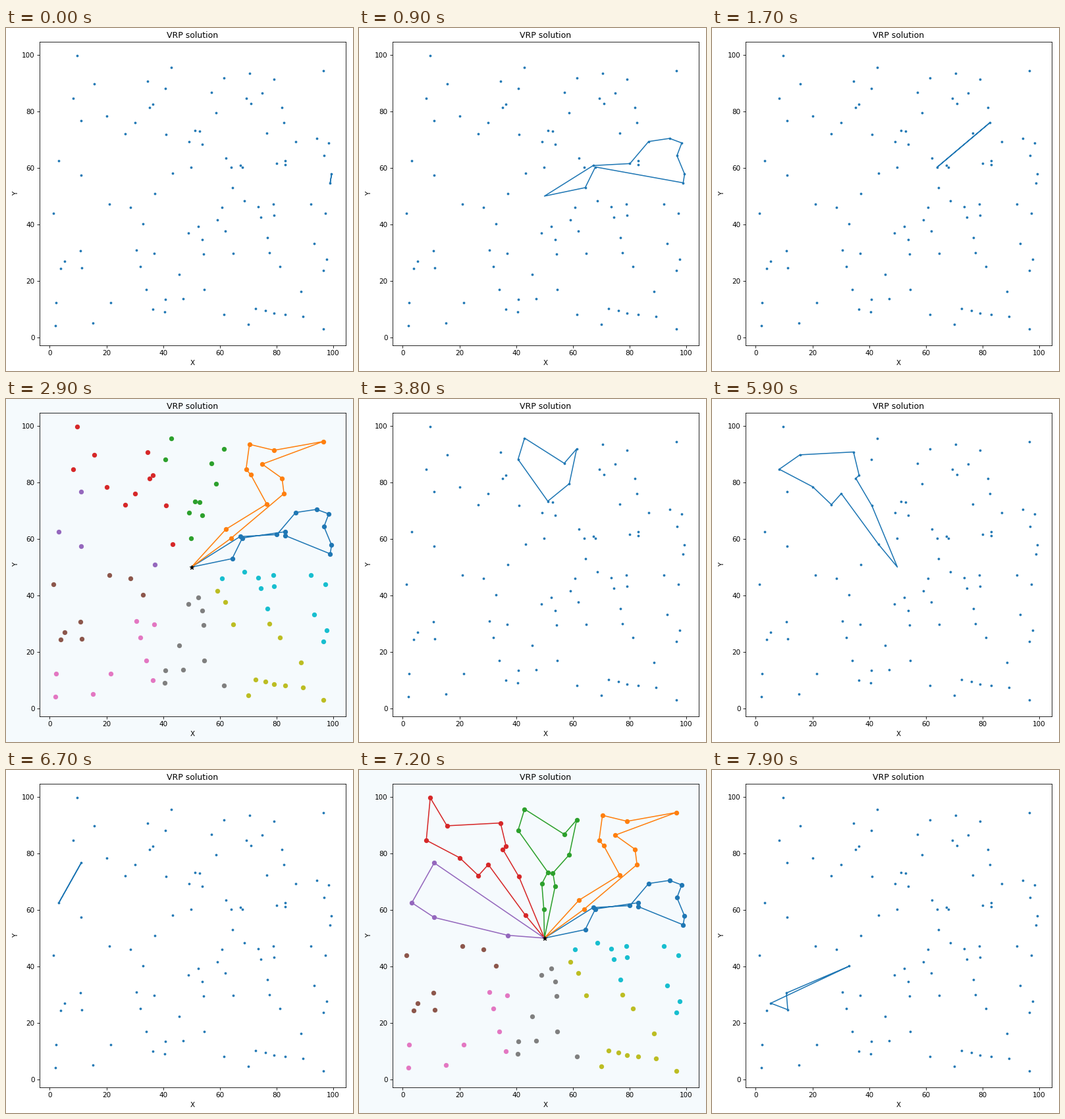
These frames come from a looping animation (527x522 px, 8 s). A matplotlib script:

```python
import math
import random

import matplotlib.pyplot as plt
from matplotlib.animation import FuncAnimation
from matplotlib.patches import Rectangle

W, H, DPI = 527, 522, 75
STEP_MS = 100
TINT = "#f5fafd"
DEPOT = (50, 50)
SECTORS = 10

plt.rcParams["font.family"] = "DejaVu Sans"

# Stops of each route in the order they are joined, one 36 degree sector each
routes = [
    [(99, 54.7), (99.5, 57.8), (96.8, 64.3), (98.5, 68.8), (94.2, 70.4),
     (86.8, 69.3), (80.2, 61.5), (67.2, 60.8), DEPOT, (64.4, 53),
     (68, 60.3), (83, 62.5), (83, 61.2)],
    [(82.7, 76), (64, 60.2), DEPOT, (62.2, 63.4), (76.6, 72.3), (71, 82.6),
     (69.3, 84.6), (70.5, 93.4), (79.2, 91.3), (96.5, 94.4), (75, 86.4),
     (82, 81.4)],
    [(58.8, 79.5), (61.4, 91.8), (57, 86.7), (43, 95.6), (40.7, 88.1),
     (51.2, 73.3), (49.1, 69.2), (49.8, 60.2), DEPOT, (53.8, 68.3),
     (53, 73)],
    [(15.6, 89.7), (34.5, 90.7), (36.5, 82.4), (35.3, 81.4), (41, 71.7),
     DEPOT, (43.3, 58.1), (30.2, 76), (26.7, 72.1), (20.1, 78.4),
     (8.3, 84.6), (9.7, 99.6)],
    [(11.1, 76.6), (3.2, 62.5), (11.1, 57.3), (37.1, 51), DEPOT],
    [(33, 40.1), (10.8, 30.6), (11.3, 24.7), (5.3, 27)],
]


def sector(point):
    angle = math.atan2(point[1] - DEPOT[1], point[0] - DEPOT[0])
    return int(angle % math.tau / math.tau * SECTORS)


def scatter_stops():
    """Group the stops by sector and fill the lower half at random."""
    rng = random.Random(5)
    groups = [[p for p in r if p != DEPOT] for r in routes]
    groups += [[] for _ in range(SECTORS - len(routes))]
    sizes = [len(g) for g in groups[:5]] + [8, 9, 10, 13, 12]
    while any(len(g) < n for g, n in zip(groups, sizes)):
        p = rng.uniform(1, 99), rng.uniform(2, 50)
        k = sector(p)
        gap = min(math.dist(p, q) for q in sum(groups, [DEPOT]))
        if gap > 2.5 and math.dist(p, DEPOT) > 9 and len(groups[k]) < sizes[k]:
            groups[k].append(p)
    return groups


def closed(points):
    return list(zip(*points, points[0]))


def build_timeline():
    """One (route, stop count) pair per frame; count 0 is the overview."""
    steps = []
    for k, route in enumerate(routes):
        steps += [(k, n) for n in range(2, len(route) + 1)]
        if k < len(routes) - 1:
            steps.append((k, len(route)))
            steps += [(k, 0)] * (4 if k == 0 else 5)
    return steps


timeline = build_timeline()
groups = scatter_stops()

fig = plt.figure(figsize=((W + 1e-6) / DPI, (H + 1e-6) / DPI), dpi=DPI)
backdrop = fig.add_artist(Rectangle((0, 0), 1, 1, transform=fig.transFigure,
                                    fc="white", ec="none", zorder=-1))
ax = fig.add_axes([51 / W, 1 - 483.2 / H, 465 / W, 462 / H])
ax.patch.set_visible(False)
ax.set(xlim=(-3.6, 104.5), ylim=(-2.8, 104.5), title="VRP solution",
       xlabel="X", ylabel="Y", xticks=range(0, 101, 20),
       yticks=range(0, 101, 20))

small_dots, = ax.plot(*zip(*sum(groups, [])), ".", ms=5.2, color="C0")
partial, = ax.plot([], [], color="C0")
big_dots = [ax.plot(*zip(*g), "o", color=f"C{k}")[0]
            for k, g in enumerate(groups)]
tours = [ax.plot(*closed(r), color=f"C{k}")[0] for k, r in enumerate(routes)]
depot, = ax.plot(*DEPOT, "k*", ms=6, zorder=3)


def draw(i):
    k, count = timeline[i]
    overview = count == 0
    backdrop.set_facecolor(TINT if overview else "white")
    for artist in (small_dots, partial):
        artist.set_visible(not overview)
    for artist in (*big_dots, depot):
        artist.set_visible(overview)
    for j, tour in enumerate(tours):
        tour.set_visible(overview and j <= k)
    if not overview:
        partial.set_data(*closed(routes[k][:count]))
    return []


anim = FuncAnimation(fig, draw, frames=len(timeline), interval=STEP_MS,
                     init_func=lambda: draw(0), repeat=True, repeat_delay=0,
                     blit=False)
plt.show()
```
